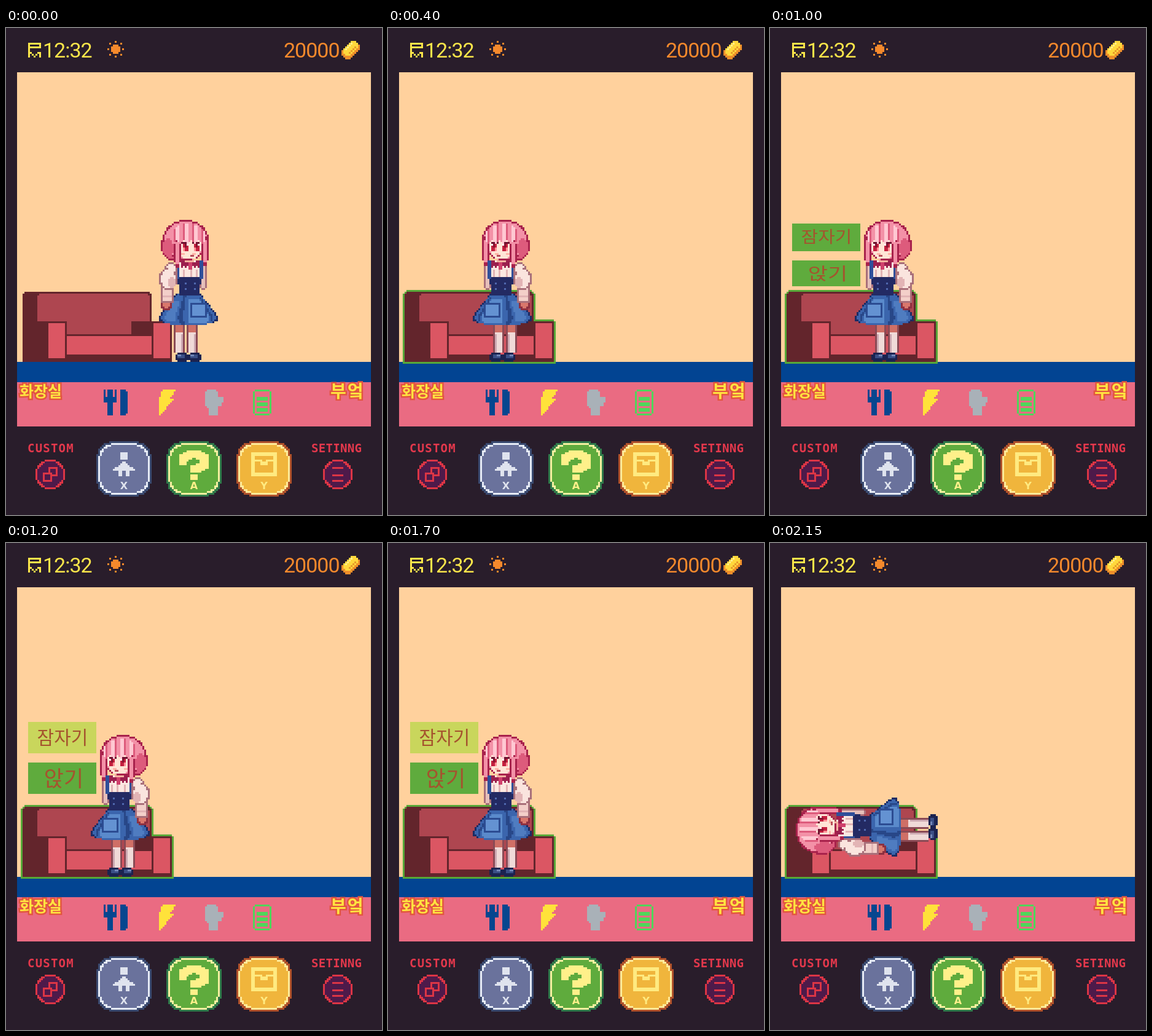
Animation, 612 px wide and 792 px high, one loop 2650 ms. Source, as an HTML page with a canvas:

```html
<!DOCTYPE html>
<html lang="ko">
<head>
<meta charset="utf-8">
<title>Room</title>
<style>
html, body { margin: 0; width: 100%; height: 100%; overflow: hidden; background: #291d2b; }
canvas, svg { position: absolute; left: 0; top: 0; width: 612px; height: 792px; }
canvas { image-rendering: pixelated; }
.num { font: 400 34px Roboto, sans-serif; letter-spacing: -1px; }
.tag { font: bold 19px "DejaVu Sans Mono", monospace; fill: #e4384c; }
.key { font: bold 16px "DejaVu Sans", sans-serif; text-anchor: middle; }
.kr { font-family: "Noto Sans CJK KR", "Noto Sans CJK", sans-serif; }
.room { fill: #ffe440; stroke: #e2563f; stroke-width: 5px; paint-order: stroke; font-weight: 700; }
.opt { fill: #a5532e; text-anchor: middle; font-weight: 500; }
</style>
</head>
<body>
<canvas id="view" width="204" height="264"></canvas>
<svg viewBox="0 0 612 792">
  <text class="num" x="60" y="48" fill="#fbe64a">12:32</text>
  <text class="num" x="452" y="48" fill="#f4892c">20000</text>
  <text class="kr room" x="22" y="600" font-size="25">화장실</text>
  <text class="kr room" x="528" y="601" font-size="28" letter-spacing="2">부엌</text>
  <text class="tag" x="35" y="690" letter-spacing="1.2">CUSTOM</text>
  <text class="tag" x="497" y="690" letter-spacing="0.3">SETINNG</text>
  <text class="key" x="192" y="750" fill="#dfe3ee">X</text>
  <text class="key" x="306" y="750" fill="#fff08a">A</text>
  <text class="key" x="420" y="750" fill="#ffea80">Y</text>
  <g class="opt"><text class="kr" y="10" font-size="30">잠자기</text></g>
  <g class="opt"><text class="kr" x="2" y="13" font-size="35">앉기</text></g>
</svg>
<script>
// All art sits on a grid of 204 x 264 cells, 3 px each.
const LOOP = 2650;
const view = document.getElementById('view').getContext('2d');
const labels = [...document.querySelectorAll('.opt')];
let g = view;

function layer(w, h, paint) {
  const c = document.createElement('canvas');
  c.width = w;
  c.height = h;
  g = c.getContext('2d');
  paint();
  g = view;
  return c;
}

function rect(color, x, y, w, h) {
  g.fillStyle = color;
  g.fillRect(x, y, w, h);
}

function frame(color, x, y, w, h) {
  rect(color, x, y, w, 1);
  rect(color, x, y + h - 1, w, 1);
  rect(color, x, y, 1, h);
  rect(color, x + w - 1, y, 1, h);
}

// Fills row by row; edges(y) gives left and right
function span(color, y0, y1, edges) {
  for (let y = Math.round(y0); y < Math.round(y1); y++) {
    const [l, r] = edges(y + 0.5).map(Math.round);
    if (r > l) rect(color, l, y, r - l, 1);
  }
}

// Superellipse: n = 2 is round, larger is squarer
function blob(color, cx, cy, rx, ry = rx, n = 2) {
  span(color, cy - ry, cy + ry, y => {
    const w = rx * Math.max(0, 1 - Math.abs((y - cy) / ry) ** n) ** (1 / n);
    return [cx - w, cx + w];
  });
}

function shape(fill, line, cx, cy, rx, ry) {
  blob(line, cx, cy, rx + 1, ry + 1);
  blob(fill, cx, cy, rx, ry);
}

function rounded(color, x, y, w, h, r) {
  span(color, y, y + h, c => {
    const d = Math.max(0, y + r - c, c - (y + h - r));
    const inset = r - Math.sqrt(r * r - d * d);
    return [x + inset, x + w - inset];
  });
}

function drawTop() {
  const y = '#fbe64a', o = '#f4892c';
  // P above M
  frame(y, 12, 8, 7, 3);
  rect(y, 12, 11, 1, 2);
  for (let i = 0; i < 7; i++) rect(y, 12 + i, 13 + Math.max(0, 2 - Math.abs(i - 3)), 1, 1);
  for (const x of [12, 18]) rect(y, x, 13, 1, 3);

  blob(o, 59.5, 11.5, 2.5);
  for (let i = 0; i < 8; i++) {
    const a = i * Math.PI / 4;
    rect(o, Math.floor(59.5 + 4 * Math.cos(a)), Math.floor(11.5 + 4 * Math.sin(a)), 1, 1);
  }

  for (let i = 0; i <= 3; i++) blob('#ef8f2a', 185.5 + i, 13.5 - i, 3.5);
  for (let i = 0; i <= 3; i++) blob('#ffd83c', 185.5 + i, 12.5 - i, 2.5);
  for (let i = 0; i < 4; i++) {
    rect('#fff08a', 184 + i, 11 - i, 1, 1);
    rect('#e89a2a', 186 + i, 13 - i, 1, 1);
  }
}

function drawIcons() {
  const navy = '#06468f', gray = '#a9b1b8', green = '#4fd65a', bolt = '#ffe23a';
  for (const x of [53, 59]) rect(navy, x, 196, 1, 6);
  rect(navy, 53, 200, 7, 3);
  rect(navy, 55, 196, 3, 14);
  rect(navy, 62, 196, 3, 14);
  rect(navy, 65, 197, 1, 12);

  span(bolt, 196, 202, y => [85 - (y - 196) * 0.4, 92 - (y - 196) * 0.6]);
  span(bolt, 201, 210, y => [82.5 + (y - 201) * 0.1, 91.5 - (y - 201) * 0.9]);

  rounded(gray, 108, 196, 7, 10, 2);
  rect(gray, 110, 205, 5, 5);
  rect(gray, 114, 202, 3, 3);
  rect(gray, 115, 200, 3, 3);

  rounded(green, 134, 196, 10, 14, 2.5);
  rounded('#ea6b82', 135, 197, 8, 12, 1.5);
  for (let i = 0; i < 3; i++) rect(green, 136, 200 + 3 * i, 6, 2);
}

function button(cx, ...colors) {
  colors.forEach((c, i) => blob(c, cx, 239, 15 - i, 15 - i, 3.4));
}

function drawHelp(fill) {
  const c = '#fff08a';
  button(102, '#2f7a4a', '#f4f0a0', fill);
  for (let i = 0; i <= 24; i++) {
    const a = Math.PI * (1 - i / 16);
    blob(c, Math.round(102 + 6 * Math.cos(a)), Math.round(235 - 4 * Math.sin(a)), 2, 2, 4);
  }
  rect(c, 100, 242, 4, 3);
}

function drawPad() {
  const red = '#dc3545', plum = '#4e1a4a', pale = '#dfe3ee', gold = '#ffea80', amber = '#f0b53c';
  button(64, '#3a4a70', '#e6ebf6', '#6a729c');
  blob(pale, 64, 232, 2, 2, 4);
  span(pale, 234, 240, y => [66 - 1.2 * (y - 233), 62 + 1.2 * (y - 233)]);
  for (const x of [61, 65]) rect(pale, x, 240, 2, 3);

  drawHelp('#5fab3d');

  button(140, '#b0512a', '#ffeb9a', amber);
  frame(gold, 133, 230, 14, 13);
  frame(gold, 134, 231, 12, 11);
  rect(gold, 135, 234, 10, 1);
  rect(gold, 138, 234, 4, 3);
  rect(amber, 139, 234, 2, 1);

  for (const x of [24, 180]) {
    blob(red, x, 242, 8);
    blob(plum, x, 242, 7);
  }
  frame(red, 23, 238, 5, 5);
  rect(plum, 20, 241, 5, 5);
  frame(red, 20, 241, 5, 5);
  for (let i = 0; i < 3; i++) rect(red, 177, Math.round(238 + 3.5 * i), 6, 1);
}

function drawSofa(near) {
  const dark = '#63252c', back = '#ae4650', soft = '#db5663';
  const body = (color, e) => {
    rounded(color, 9 - e, 143 - e, 70 + 2 * e, 38 + 2 * e, 3 + e);
    rounded(color, 60, 159 - e, 30 + e, 22 + e, 1 + e);
    rect(color, 9 - e, 170, 81 + 2 * e, 11 + e);
  };
  if (near) body('#57a838', 1);
  body(dark, 0);
  rounded(back, 17, 144, 61, 15, 3);
  rect(back, 17, 155, 61, 4);
  rect(back, 33, 159, 35, 7);
  rect(soft, 33, 167, 46, 10);
  for (const x of [23, 80]) rounded(soft, x, 160, 9, 19, 1.5);
}

function drawLegs() {
  for (const x of [10, 17]) {
    rect('#8a4a55', x - 1, 57, 6, 15);
    rect('#cf6f66', x, 57, 4, 4);
    rect('#f0dad8', x, 61, 4, 11);
    rect('#cda9b2', x + 3, 62, 1, 10);
    rounded('#1b2350', x, 72, 7, 5, 2);
    rect('#3a4f86', x + 1, 73, 4, 2);
    rect('#7186b8', x + 1, 73, 2, 1);
  }
}

function drawSkirt() {
  const half = y => y < 53
    ? 6 + 10.5 * ((y - 40) / 13) ** 0.9
    : 16.5 * Math.sqrt(Math.max(0, 1 - ((y - 53) / 4.5) ** 2));
  // a and b are shares of the half width
  const panel = (color, a, b, top = 40, end = 57) =>
    span(color, top, end, y => [17 + a * half(y), 17 + b * half(y)]);
  panel('#1d2b63', -1, 1, 40, 58);
  panel('#3b65ad', -0.93, 0.93);
  panel('#4f7cc0', -0.8, -0.45, 44, 55);
  panel('#284788', -0.35, -0.18);
  panel('#5a8acb', 0, 0.7, 43, 56);
  panel('#284788', 0.74, 0.82, 42, 55);
  rect('#6492d2', 18, 45, 9, 8);
  frame('#2c4c92', 18, 45, 9, 8);
}

function drawTorso() {
  const line = '#a9707a', cream = '#fae4de', shade = '#e2b4b5';
  shape('#e6bfba', line, 25, 31, 1.5, 6);
  rect('#fbe8e1', 10, 22, 15, 9);
  for (const x of [14, 18, 21]) rect(shade, x, 27, 1, 4);
  span('#232a63', 31, 41, y => [11 + (y - 31) / 8, 24 - (y - 31) / 8]);
  for (const x of [15, 20]) for (const y of [34, 37]) rect('#5068ae', x, y, 1, 1);
  for (const x of [10, 23]) rect('#2f4f9a', x, 22, 2, 10);

  shape('#d9776c', '#8e3040', 5, 46, 2, 2);
  rounded(line, 2, 36, 7, 9, 1);
  rect('#f3cfc9', 3, 37, 5, 7);
  rect(shade, 3, 41, 5, 1);
  shape(cream, line, 7.5, 27, 2.5, 3);
  shape(cream, line, 6, 32, 4, 5);
  blob(cream, 7.5, 28, 2, 3);
  blob(shade, 8, 34, 2, 3);
}

function drawHead() {
  const line = '#a8224c', rose = '#dd5b7c', pink = '#f391a7', pale = '#ffc8d2';
  rect('#f2b09f', 15, 20, 5, 4);
  shape(rose, line, 8, 14, 5, 7);
  shape(pink, line, 15.5, 11, 11.5, 10);
  blob('#ffe5d6', 17.5, 14.5, 6.5, 7);
  blob(rose, 6, 15, 3, 5);

  for (const x of [14, 20]) {
    rect('#6d1230', x - 1, 12, 4, 1);
    rect('#c4203f', x, 13, 3, 4);
    rect('#84142f', x + 1, 13, 1, 2);
    rect('#ff9297', x, 15, 1, 2);
    rect('#ffffff', x + 2, 13, 1, 1);
    rect('#ffb5a8', x - 1, 18, 2, 1);
  }
  rect('#b8505a', 18, 19, 2, 1);

  shape(pink, line, 11, 18, 1, 7);
  shape(pink, line, 26, 17, 1, 7);
  // fringe, one strand per column
  const strands = [pale, pale, pink, pink, rose];
  for (let x = 8; x < 26; x++) {
    const top = Math.round(11 - 9 * Math.sqrt(1 - ((x - 16.5) / 10) ** 2));
    rect(strands[x % 5], x, top, 1, 11 + Math.abs(x % 4 - 2) - top);
  }

  for (let i = 0; i < 5; i++) for (const x of [17 - i, 18 + i]) rect('#9b1f4e', x, 24 - i / 2 | 0, 1, 2 + (i >> 1));
  rect('#d0406c', 17, 23, 2, 4);
}

const stage = layer(204, 264, () => {
  rect('#291d2b', 0, 0, 204, 264);
  rect('#ffd19d', 6, 24, 192, 157);
  rect('#024492', 6, 181, 192, 11);
  rect('#ea6b82', 6, 192, 192, 24);
  drawTop();
  drawIcons();
  drawPad();
});
const girl = layer(34, 77, () => {
  drawLegs();
  drawSkirt();
  drawTorso();
  drawHead();
});

const PRESS = 600, PICK = 1200, CONFIRM = 1950, LIE = 2150;

// Highlighted option: alternates, then blinks once
function picked(t) {
  if (t < PICK) return -1;
  if (t < CONFIRM) return Math.floor((t - PICK) / 250) % 2;
  return Math.floor((t - CONFIRM) / 100) - 1;
}

function drawMenu(t) {
  const open = t >= PRESS && t < LIE;
  const k = Math.min(1, (Math.floor((t - PRESS) / 100) + 1) / 6);
  labels.forEach((label, i) => {
    label.style.display = open ? '' : 'none';
    if (!open) return;
    const h = Math.round(17 * k + (3 - 4 * i) * (1 - k));
    const mid = 105.5 + 22 * i + (45 - 10 * i) * (1 - k);
    const top = Math.round(mid - h / 2);
    rect(i === picked(t) ? '#c9d65c' : '#5fab3d', 12, top, 37, h);
    label.setAttribute('transform', `translate(92 ${(top + h / 2) * 3}) scale(1 ${h / 17})`);
  });
}

function drawGirl(t) {
  const left = Math.max(0, 4 - Math.floor(t / 100));
  const x = Math.floor(45 + 7.5 * left);
  if (t >= LIE) view.setTransform(0, -1, 1, 0, 14, 171);
  else if (left === 4) view.setTransform(1, 0, 0, 1, x + 7, 104);
  else view.setTransform(-1, 0, 0, 1, x + 34, 104);
  view.drawImage(girl, 0, 0);
  view.setTransform(1, 0, 0, 1, 0, 0);
}

function draw(t) {
  view.imageSmoothingEnabled = false;
  view.drawImage(stage, 0, 0);
  if (t >= PRESS && t < PRESS + 100) drawHelp('#3f8a35');
  drawSofa(t >= 100);
  drawMenu(t);
  drawGirl(t);
}

const start = performance.now();
function tick() {
  draw((performance.now() - start) % LOOP);
  requestAnimationFrame(tick);
}
tick();
</script>
</body>
</html>
```
